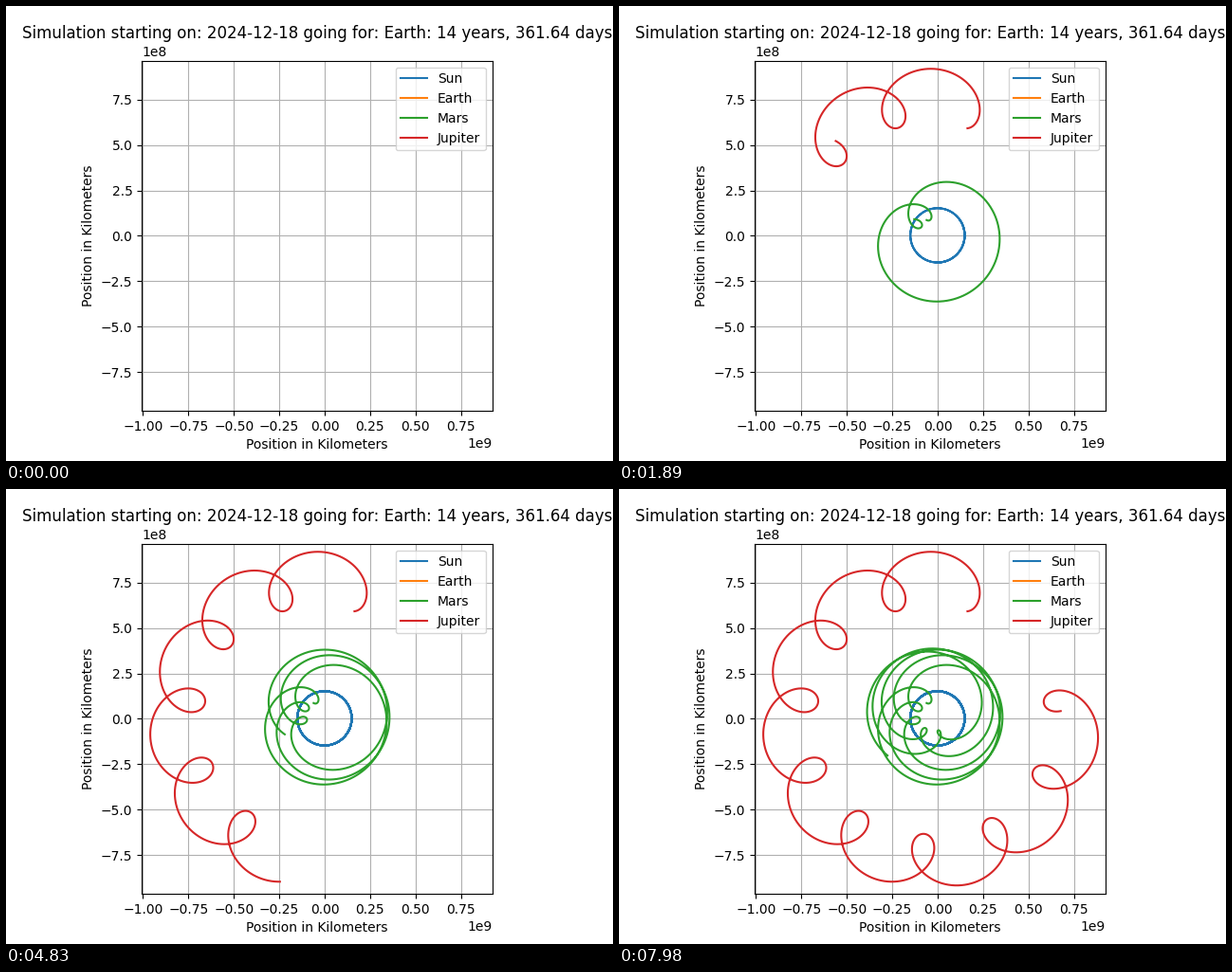
Write a matplotlib script that moves like this. It is 640x480 px and loops after 8000 ms.

```python
import numpy as np
import matplotlib.pyplot as plt
from matplotlib.animation import FuncAnimation

FRAMES = 267
AU = 1.495978707e8              # km
START = 9117.5                  # days from J2000 to 2024-12-18
DAYS_PER_FRAME = 5475.14 / 400
SUBSTEPS = 14

# a [AU], e, mean longitude, its rate, perihelion longitude, its rate (deg, deg/century)
ORBITS = {
    "Earth": (1.00000261, 0.01671123, 100.46457, 35999.37245, 102.93768, 0.32327),
    "Mars": (1.52371034, 0.09339410, -4.55343, 19140.30268, -23.94363, 0.44441),
    "Jupiter": (5.20288700, 0.04838624, 34.39644, 3034.74613, 14.72848, 0.21253),
}


def heliocentric(name, days):
    """Ecliptic position as complex x + iy, in km."""
    a, e, lon, lon_rate, peri, peri_rate = ORBITS[name]
    cent = days / 36525
    w = np.radians(peri + peri_rate * cent)
    m = np.radians(lon + lon_rate * cent) - w
    ecc = m + e * np.sin(m)
    for _ in range(6):
        ecc -= (ecc - e * np.sin(ecc) - m) / (1 - e * np.cos(ecc))
    orbit = np.cos(ecc) - e + 1j * np.sqrt(1 - e * e) * np.sin(ecc)
    return a * AU * orbit * np.exp(1j * w)


days = START + np.arange(FRAMES * SUBSTEPS + 1) * DAYS_PER_FRAME / SUBSTEPS
earth = heliocentric("Earth", days)
paths = {
    "Sun": -earth,
    "Earth": None,              # stays at the centre, so it leaves no trail
    "Mars": heliocentric("Mars", days) - earth,
    "Jupiter": heliocentric("Jupiter", days) - earth,
}

fig, ax = plt.subplots(figsize=(6.4, 4.8), dpi=100)
ax.set_aspect("equal")
ax.set_xlim(-1.0065e9, 0.9235e9)
ax.set_ylim(-0.965e9, 0.965e9)
ax.set_xlabel("Position in Kilometers")
ax.set_ylabel("Position in Kilometers")
ax.set_title("Simulation starting on: 2024-12-18 going for: "
             "Earth: 14 years, 361.64 days")
ax.grid(True)
lines = {name: ax.plot([], [], label=name)[0] for name in paths}
ax.legend(loc="upper right")


def update(frame):
    count = frame * SUBSTEPS + 1 if frame else 0
    for name, path in paths.items():
        if path is not None:
            lines[name].set_data(path.real[:count], path.imag[:count])
    return list(lines.values())


def reset():
    return update(0)


anim = FuncAnimation(fig, update, frames=FRAMES, init_func=reset,
                     interval=30, repeat=True, repeat_delay=0)
plt.show()
```
